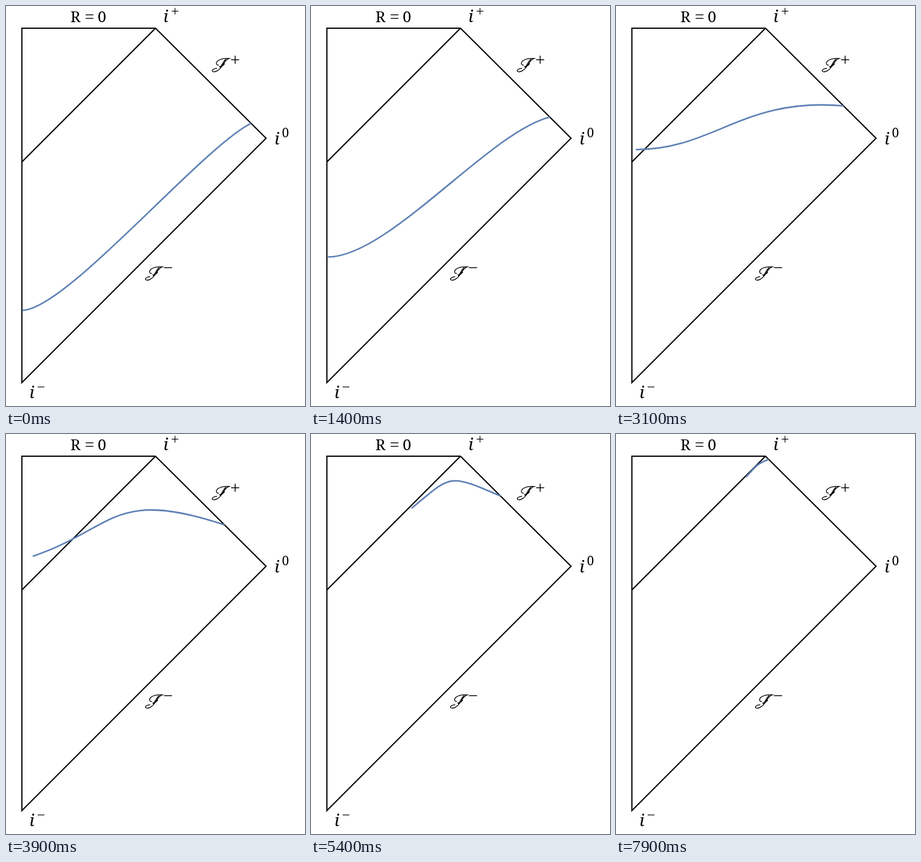
Write an HTML page with a canvas that moves like this. It is 499 px wide and 667 px high and loops after 8 s.

```html
<!DOCTYPE html>
<html lang="en">
<head>
<meta charset="utf-8">
<title>Conformal diagram</title>
<style>
  html, body { margin: 0; width: 100%; height: 100%; overflow: hidden; background: #fff; }
  canvas { display: block; }
</style>
</head>
<body>
<canvas id="stage" width="499" height="667"></canvas>
<script>
const ctx = document.getElementById('stage').getContext('2d');
const LOOP = 8, FPS = 10;
const LEFT = 26.5, TOP = 37;
const tip = [249.5, TOP], right = [434, 220.5], base = [LEFT, 628];

// Smooth monotone curve through [seconds, value] points, flat outside them
function track(...pts) {
  const last = pts.length - 1;
  const rate = i => (pts[i + 1][1] - pts[i][1]) / (pts[i + 1][0] - pts[i][0]);
  const slope = i => {
    if (i === 0) return rate(0);
    if (i === last) return rate(last - 1);
    const a = rate(i - 1), b = rate(i);
    return a * b > 0 ? 2 * a * b / (a + b) : 0;
  };
  return t => {
    if (t <= pts[0][0]) return pts[0][1];
    if (t >= pts[last][0]) return pts[last][1];
    const i = pts.findIndex(p => p[0] > t) - 1;
    const [t0, v0] = pts[i], [t1, v1] = pts[i + 1];
    const h = t1 - t0, s = (t - t0) / h, r = 1 - s;
    return v0 * r * r * (1 + 2 * s) + v1 * s * s * (3 - 2 * s)
      + h * s * r * (slope(i) * r - slope(i + 1) * s);
  };
}

const startX = track([0, 27], [2.3, 29.5], [3.6, 37.5], [4.5, 78.5], [4.7, 115.5], [5.4, 168], [6.3, 195], [7.9, 217]);
const startY = track([0, 507.5], [1.4, 418.5], [2.3, 336.5], [3.1, 239.5], [3.6, 220.5], [4.7, 155], [6.3, 94.5], [7.9, 71.5]);
const endX = track([0, 409], [2.3, 390.5], [3.6, 371], [4.7, 343], [6.3, 286.5], [7.2, 276], [7.9, 254.7]);
const startSlope = track([3.1, 0], [4.7, -0.63], [6.3, -0.97], [7.9, -1]);
const endSlope = track([0, -0.5], [3.1, 0.09], [4, 0.35], [4.8, 0.42], [7.2, 0.45], [7.9, -0.4]);
const startReach = t => Math.min(0.45, 0.19 + 0.06 * t);
const endReach = track([0, 0.22], [2.3, 0.32], [3.7, 0.58], [4.7, 0.6]);

function line(points, close) {
  ctx.beginPath();
  points.forEach(p => ctx.lineTo(...p));
  if (close) ctx.closePath();
  ctx.stroke();
}

function text(str, x, y, size, style = '') {
  ctx.font = `${style} ${size}px "Noto Serif", serif`;
  ctx.fillText(str, x, y);
}

const letter = (x, y) => text('i', x, y, 28, 'italic');

// math sign centred on a point
function sign(str, x, y, size) {
  ctx.font = `${size}px "Liberation Serif", serif`;
  ctx.textAlign = 'center';
  ctx.fillText(str, x, y + size * 0.253);
  ctx.textAlign = 'left';
}

// script capital I
const script = new Path2D(
  'M355 98.5C350 99 350 94 354 91C359 87.5 366 87 372 87.5' +
  'C366 89 364 96 360 101C356 107 349 111.5 344.5 109C343 106.5 348 104 352 104' +
  'M367 88.5C363 92 361 98 357 103M356 101C360 101 363 99 365 96');

function scri(dx, dy) {
  ctx.save();
  ctx.translate(dx, dy);
  ctx.lineWidth = 1.3;
  ctx.stroke(script);
  ctx.restore();
}

function drawDiagram() {
  ctx.strokeStyle = ctx.fillStyle = '#000';
  ctx.lineWidth = 2.1;
  line([[LEFT, TOP], tip, right, base], true);
  line([[LEFT, 260], tip]);

  text('R', 107.5, 27, 25.5);
  sign('=', 139.5, 20, 28);
  text('0', 153, 27, 25.5);
  letter(262.5, 27);
  sign('+', 282, 9.5, 24);
  letter(448, 231);
  text('0', 460.5, 219, 21);
  letter(39, 654);
  sign('\u2212', 58.5, 636.5, 24);
  scri(0, 0);
  sign('+', 382.5, 91.5, 29);
  scri(-111.5, 347.5);
  sign('\u2212', 270.5, 438.5, 29);
}

function drawSlice(t) {
  const x0 = startX(t), y0 = startY(t), x1 = endX(t);
  const y1 = TOP + (x1 - tip[0]) * (right[1] - TOP) / (right[0] - tip[0]);
  const a = startReach(t) * (x1 - x0), b = endReach(t) * (x1 - x0);
  ctx.strokeStyle = '#5e81b5';
  ctx.lineWidth = 2.6;
  ctx.beginPath();
  ctx.moveTo(x0, y0);
  ctx.bezierCurveTo(x0 + a, y0 + a * startSlope(t), x1 - b, y1 - b * endSlope(t), x1, y1);
  ctx.stroke();
}

function frame() {
  const t = Math.floor(performance.now() / 1000 % LOOP * FPS) / FPS;
  ctx.fillStyle = '#fff';
  ctx.fillRect(0, 0, 499, 667);
  drawDiagram();
  drawSlice(t);
  requestAnimationFrame(frame);
}
frame();
</script>
</body>
</html>
```
